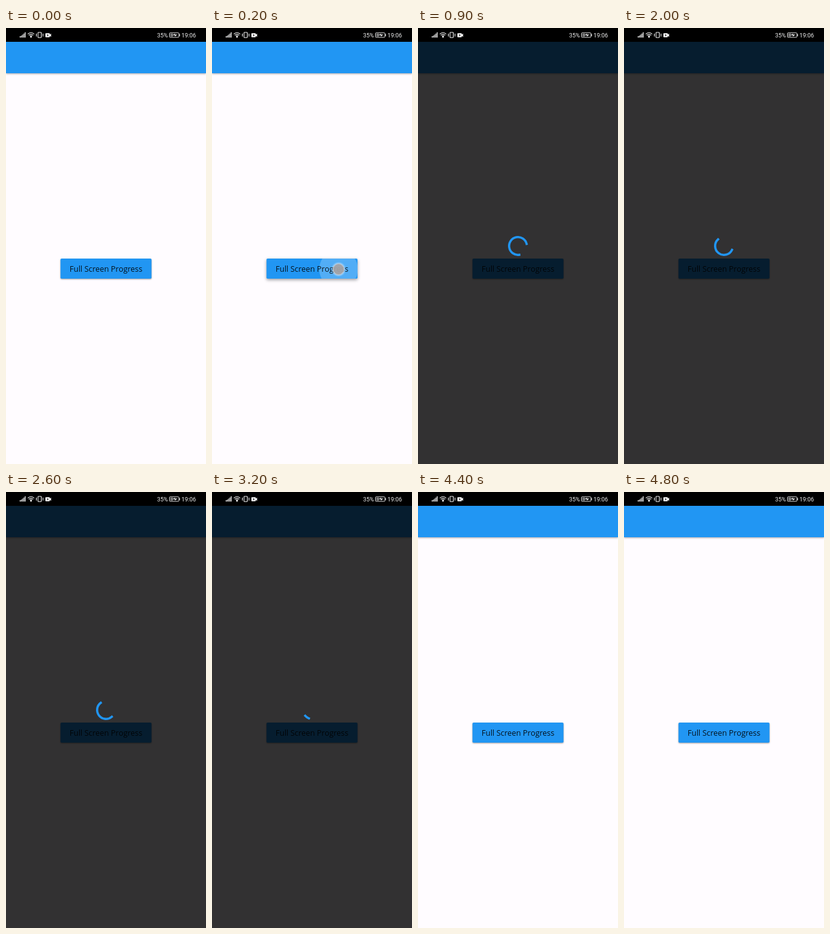
These frames come from a looping animation (320 by 694 pixels, 4900 ms). An HTML page:

```html
<!DOCTYPE html>
<html lang="en">
<head>
<meta charset="utf-8">
<title>Full Screen Progress</title>
<style>
html, body { margin: 0; width: 100%; height: 100%; overflow: hidden; background: #fffcff; }
svg { display: block; width: 100%; height: 100%; }
.status { font: 9.3px Roboto, sans-serif; fill: #f2f2f2; }
.label { font: 12.44px "Open Sans", sans-serif; fill: #000; fill-opacity: .87; text-anchor: middle; }
#bar { filter: drop-shadow(0 1.5px 1.5px rgba(0,0,0,.35)); }
</style>
</head>
<body>
<svg viewBox="0 0 320 694">
  <defs>
    <clipPath id="face"><rect x="87.2" y="367" width="145.6" height="32" rx="1.8"/></clipPath>
    <radialGradient id="glow">
      <stop offset=".7" stop-color="#fff" stop-opacity=".5"/>
      <stop offset="1" stop-color="#fff" stop-opacity="0"/>
    </radialGradient>
  </defs>

  <rect width="320" height="694" fill="#fffcff"/>
  <rect id="bar" y="22" width="320" height="50" fill="#2196f3"/>
  <rect id="button" x="87.2" y="367" width="145.6" height="32" rx="1.8" fill="#2196f3"/>
  <g clip-path="url(#face)"><circle id="ripple" cx="202.5" cy="384" fill="#fff"/></g>
  <text class="label" x="160" y="388">Full Screen Progress</text>

  <rect id="shade" y="22" width="320" height="672" fill="#000" fill-opacity=".805"/>
  <path id="arc" fill="none" stroke="#2196f3" stroke-width="3.56" stroke-linecap="square"/>

  <g id="touch">
    <circle cx="202.5" cy="384" r="12" fill="url(#glow)"/>
    <circle cx="202.5" cy="384" r="8.6" fill="#a09fa2" fill-opacity=".9" stroke="#c2c2c6" stroke-width="1"/>
  </g>

  <rect width="320" height="22" fill="#000"/>
  <g fill="#f2f2f2">
    <path d="M22 13h1.3v2.3h-1.3zM24 12h1.3v3.3h-1.3zM26 10.4h1.3v4.9h-1.3zM28 8.7h1.3v6.6h-1.3zM30 6.8h1.3v8.5h-1.3z"/>
    <circle cx="40" cy="14.3" r="1.2"/>
    <path d="M48 9h1.1v4.5h-1.1zM58.6 9h1.1v4.5h-1.1z"/>
    <path d="M64 8.3h5a1 1 0 0 1 1 1v1l2.2-1.4v5.2l-2.2-1.4v1a1 1 0 0 1-1 1h-5a1 1 0 0 1-1-1v-4.400a1 1 0 0 1 1-1z"/>
    <path d="M277.200 9.500h1.100v3.500h-1.100z"/>
    <path d="M262.800 8.900h4.500v4.700h-4.500z" opacity=".5"/>
    <path d="M266 11.600l4.500-2.700v1.700h4l-4.500 3v-2z"/>
  </g>
  <path d="M66 9.900l2.100 1.500-2.100 1.500z" fill="#000"/>
  <g fill="none" stroke="#f2f2f2" stroke-width="1.1">
    <path d="M34.800 9.700q5.200-4.300 10.400 0M36.500 11.500q3.500-2.800 7 0M38.200 13q1.800-1.400 3.600 0"/>
    <rect x="51.200" y="7" width="5.300" height="8.300" rx=".8"/>
    <rect x="261.500" y="7.700" width="15.200" height="7.100" rx="1" stroke-width=".9"/>
  </g>
  <text class="status" x="241.700" y="14.800">35%</text>
  <text class="status" x="280.800" y="14.800">19:06</text>
</svg>
<script>
const LOOP = 4900, STEP = 100, CYCLE = 1333;
const DIM_ON = 300, DIM_OFF = 4400;
const CX = 160, CY = 347, R = 14.2;
// [stage time, spinner clock]: the clock starts slowly, then runs fast
const CLOCK = [[300, 74], [900, 725], [2000, 2170], [3200, 3746], [4300, 5228]];

const $ = id => document.getElementById(id);
const clamp = x => Math.min(1, Math.max(0, x));
const show = (id, on) => $(id).setAttribute("visibility", on ? "visible" : "hidden");

// cubic-bezier(.4, 0, .2, 1)
function ease(x) {
  if (x <= 0 || x >= 1) return clamp(x);
  let lo = 0, hi = 1;
  for (let i = 0; i < 24; i++) {
    const u = (lo + hi) / 2, v = 1 - u;
    if (1.2 * v * v * u + 0.6 * v * u * u + u * u * u < x) lo = u; else hi = u;
  }
  return lo * lo * (3 - 2 * lo);
}

function spinnerClock(t) {
  let i = 1;
  while (i < CLOCK.length - 1 && t > CLOCK[i][0]) i++;
  const [t0, a] = CLOCK[i - 1], [t1, b] = CLOCK[i];
  return a + (b - a) * (t - t0) / (t1 - t0);
}

function arcPath(ms) {
  const n = Math.floor(ms / CYCLE), p = ms / CYCLE - n;
  const head = ease(p * 2), tail = ease(p * 2 - 1);
  const start = Math.PI * (-0.5 + 3.2 * n + 1.7 * p + 1.5 * tail);
  const sweep = Math.max(Math.PI * 1.5 * (head - tail), 0.001);
  const at = a => (CX + R * Math.cos(a)).toFixed(3) + " " + (CY + R * Math.sin(a)).toFixed(3);
  return `M${at(start)}A${R} ${R} 0 ${sweep > Math.PI ? 1 : 0} 1 ${at(start + sweep)}`;
}

function draw(time) {
  const t = Math.floor((time % LOOP) / STEP) * STEP;
  const dim = t >= DIM_ON && t < DIM_OFF;
  show("shade", dim);
  show("arc", dim);
  if (dim) $("arc").setAttribute("d", arcPath(spinnerClock(t)));

  show("touch", t >= 100 && t < 500);
  $("touch").setAttribute("opacity", t < 400 ? 1 : 0.4);

  const pressed = t >= 100 && t < 700;
  show("ripple", pressed);
  $("ripple").setAttribute("r", 15 + 0.16 * Math.max(0, t - 100));
  $("ripple").setAttribute("opacity", 0.22 * clamp((700 - t) / 400));
  const lift = pressed ? clamp((700 - t) / 400) : 0;
  $("button").style.filter =
    `drop-shadow(0 ${1 + lift}px ${1 + 1.5 * lift}px rgba(0,0,0,.38))`;
}

function tick() {
  draw(performance.now());
  requestAnimationFrame(tick);
}
tick();
</script>
</body>
</html>
```
